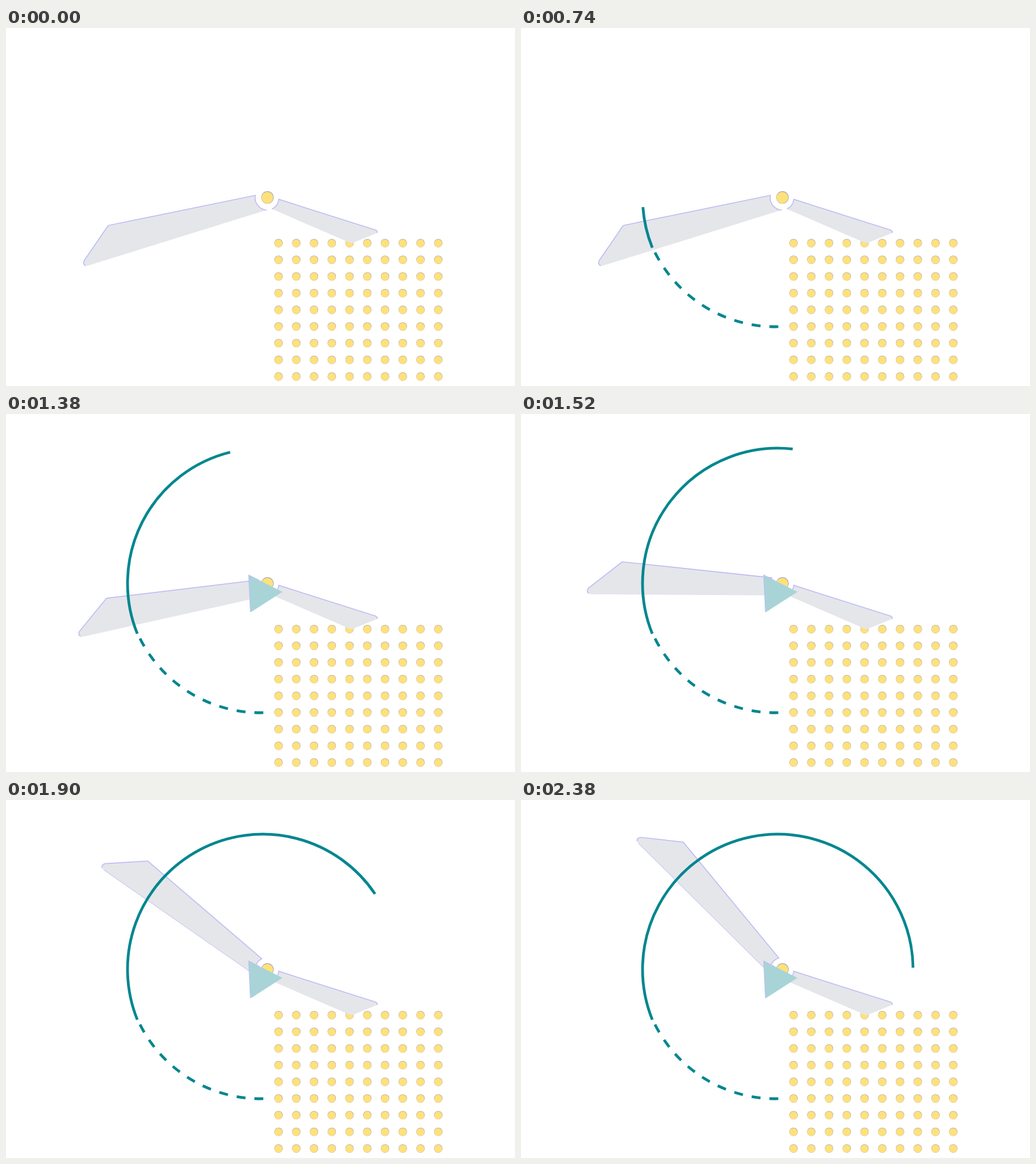
An HTML page for the animation above (2.4 s loop, 892 by 628 pixels).

```html
<!DOCTYPE html>
<html lang="en">
<head>
<meta charset="utf-8">
<title>Seesaw</title>
<style>
  html, body { margin: 0; width: 100%; height: 100%; overflow: hidden; background: #fff; }
  svg { display: block; width: 892px; height: 628px; }
  .plate { fill: #e5e6ea; }
  .edge { fill: none; stroke: #bfbcf5; stroke-width: 1.7; }
  .arc { fill: none; stroke: #00868f; stroke-width: 4.8; }
  .rim { fill: #a9a6b4; }
  .dot { fill: #ffe17a; }
</style>
</head>
<body>
<svg viewBox="0 0 892 628">
  <g id="dots"></g>
  <g>
    <path class="plate" d="M478 300.5L648 354.5Q653 358 648 360.5L610 376Q605 378.5 600 375.5L466 317.5A21 21 0 0 0 478 300.5Z"/>
    <path class="edge" d="M466 317.5A21 21 0 0 0 478 300.5L648 354.5Q652 357 650 359.5"/>
  </g>
  <g id="wing">
    <path class="plate" d="M437 293.5L181 346Q179 346.3 178 348L137 408Q133 419 144 416.8L456 319.5A22 22 0 0 1 437 293.5Z"/>
    <path class="edge" id="under" style="stroke-width:1" d="M144 416.8L456 319.5"/>
    <path class="edge" d="M457 319.5A22 22 0 0 1 437 293.5L181 346Q179 346.3 178 348L137 408Q134 415 140 417"/>
  </g>
  <path class="arc" id="dashed" stroke-dasharray="15.6 15.7"/>
  <path class="arc" id="solid"/>
  <circle class="rim" cx="458.2" cy="297.2" r="10.9"/>
  <circle class="dot" cx="458" cy="297.6" r="10.2"/>
  <g id="tri">
    <path d="M425 282L484.5 312L428.5 348Z" fill="#a8d4d7"/>
    <path class="edge" d="M428.3 347L425.3 282.5L444 292" style="stroke-width:1.2"/>
  </g>
</svg>
<script>
const LOOP = 2400;
const $ = id => document.getElementById(id);
const clamp = x => Math.max(0, Math.min(1, x));
const span = (t, a, b) => clamp((t - a) / (b - a));
const smooth = u => u * u * (3 - 2 * u);

function circle(cls, cx, cy, r) {
  const c = document.createElementNS('http://www.w3.org/2000/svg', 'circle');
  c.setAttribute('class', cls);
  c.setAttribute('cx', cx);
  c.setAttribute('cy', cy);
  c.setAttribute('r', r);
  $('dots').appendChild(c);
}
for (let row = 0; row < 9; row++) {
  for (let col = 0; col < 10; col++) {
    const x = 477.5 + 31.1 * col, y = 377.6 + 29.25 * row;
    circle('rim', x + 0.1, y - 0.3, 7.4);
    circle('dot', x, y + 0.1, 6.9);
  }
}

// Angles run clockwise from the leftmost point, in degrees.
function arc(cx, cy, r, from, to) {
  if (Math.abs(to - from) < 0.01) return '';
  const at = a => {
    const k = a * Math.PI / 180;
    return (cx - r * Math.cos(k)).toFixed(2) + ' ' + (cy - r * Math.sin(k)).toFixed(2);
  };
  const large = Math.abs(to - from) > 180 ? 1 : 0;
  return `M${at(from)}A${r} ${r} 0 ${large} ${to > from ? 1 : 0} ${at(to)}`;
}

// Wing swing: time, angle, speed
const SWING = [
  [1200, 0, 0], [1520, 17.7, 0.13], [1620, 30.8, 0.122],
  [1740, 43, 0.08], [2060, 57, 0.025], [2400, 62.3, 0.01]
];
function swing(t) {
  if (t <= SWING[0][0]) return 0;
  let i = 0;
  while (i < SWING.length - 2 && t > SWING[i + 1][0]) i++;
  const [t0, a0, v0] = SWING[i], [t1, a1, v1] = SWING[i + 1];
  const d = t1 - t0, u = (t - t0) / d;
  return a0 + (a1 - a0) * smooth(u) + d * u * (1 - u) * (v0 * (1 - u) - v1 * u);
}

function draw(t) {
  const tip = -91.2 + 64.5 * span(t, 0, 360);
  $('dashed').setAttribute('d', arc(446, 287.6, 236.4, tip, -91.2));
  const end = -21.9 + 201.7 * smooth(span(t, 360, 2440));
  $('solid').setAttribute('d', arc(450, 297, 237, -21.9, end));
  const a = swing(t);
  $('wing').setAttribute('transform', `rotate(${a.toFixed(3)} 458 297.5)`);
  $('under').setAttribute('opacity', 0.8 * clamp(a / 50));
  $('tri').setAttribute('opacity', span(t, 1000, 1160));
}

let start = null;
function tick(now) {
  if (start === null) start = now;
  draw((now - start) % LOOP);
  requestAnimationFrame(tick);
}
draw(0);
requestAnimationFrame(tick);
</script>
</body>
</html>
```
